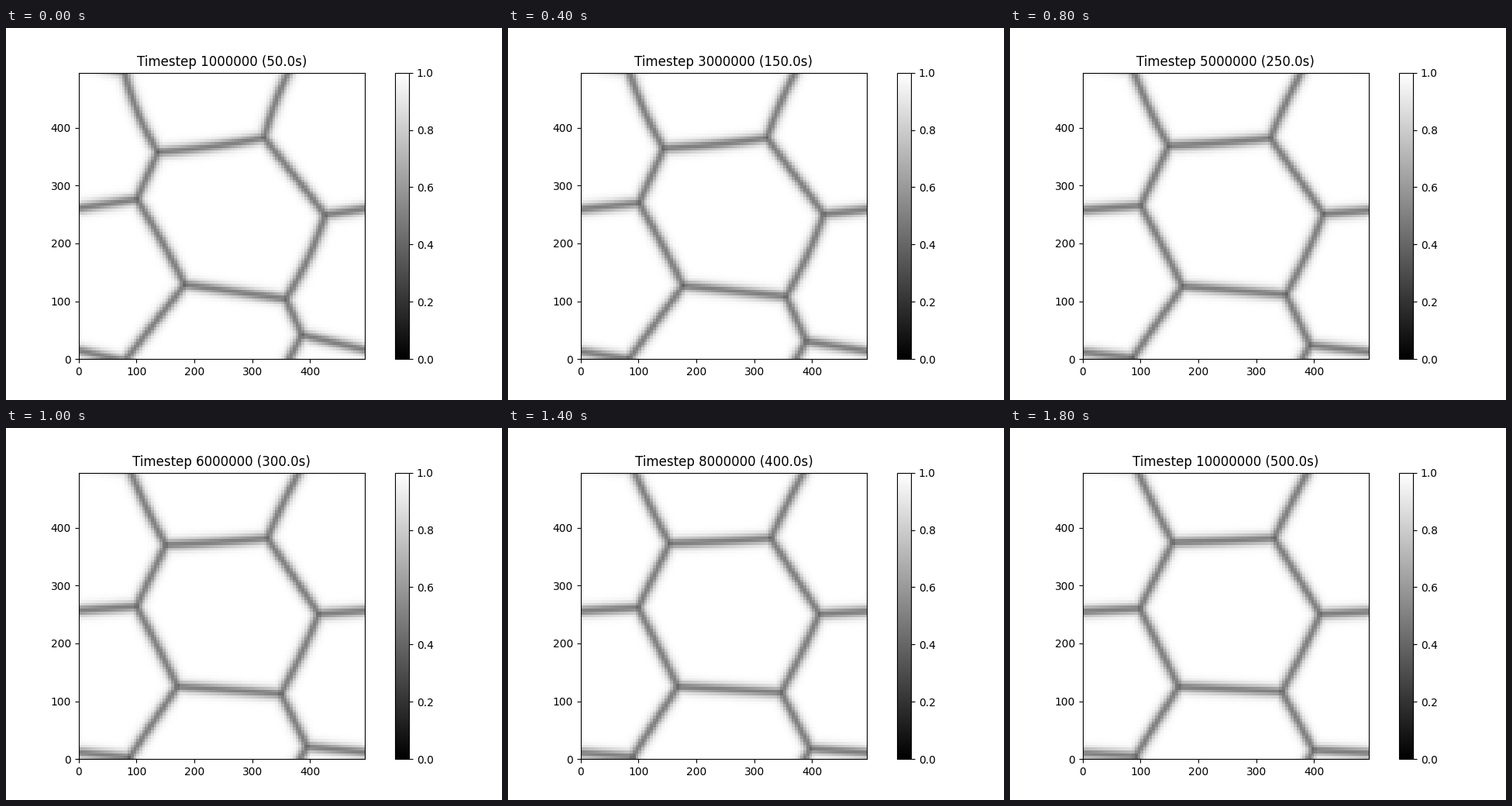
These frames come from a looping animation (640x480 px, 2000 ms). A matplotlib script:

```python
import numpy as np
import matplotlib.pyplot as plt
from matplotlib.animation import FuncAnimation

FRAMES, INTERVAL = 10, 200
PERIOD, CELL = 500.0, 5.0
WALL = 8.8        # wall thickness scale
SHARPNESS = 5.5   # how strongly walls add up where they meet
RELAX = 5.5       # relaxation time in steps

# Triple junctions at the start, after 3 steps and after 9 steps.
JUNCTIONS = {
    "A": [(137.1, 357.8), (146.5, 366.5), (155.9, 374.6)],
    "B": [(320.6, 382.6), (323.3, 381.9), (331.3, 381.5)],
    "C": [(426.4, 249.4), (418.4, 250.7), (411.0, 250.7)],
    "D": [(358.1, 104.1), (353.4, 110.1), (344.7, 116.8)],
    "E": [(183.3, 128.8), (174.6, 126.2), (165.9, 125.1)],
    "F": [(101.0, 276.2), (101.0, 267.4), (99.0, 260.1)],
    "G": [(386.2, 41.8), (391.6, 27.1), (399.0, 15.7)],
    "H": [(79.5, -3.7), (84.9, 0.9), (91.6, 5.0)],
}

# Walls between junctions with their initial bulge to the left.
WALLS = [
    ("A", "B", -3), ("B", "C", 0), ("C", "D", 5), ("D", "E", 0),
    ("E", "F", -2), ("F", "A", 0), ("A", "H", 6), ("F", "C", 0),
    ("D", "G", 0), ("G", "B", -5.5), ("G", "H", 0), ("E", "H", 0),
]

edges = np.arange(0, PERIOD, CELL)
centres = edges[:-1] + CELL / 2
X, Y = np.meshgrid(centres, centres)


def wrap(d):
    """Shortest difference on the periodic domain."""
    return d - PERIOD * np.round(d / PERIOD)


def progress(step):
    return (1 - np.exp(-step / RELAX)) / (1 - np.exp(-9 / RELAX))


def junction(name, u):
    """Quadratic path through the three known places."""
    p0, p1, p2 = np.array(JUNCTIONS[name])
    m = progress(3)
    return (p0 * (u - m) * (u - 1) / m
            + p1 * u * (u - 1) / (m * (m - 1))
            + p2 * u * (u - m) / (1 - m))


def wall_points(p, q, bulge, n=10):
    chord = wrap(q - p)
    normal = np.array([-chord[1], chord[0]]) / np.hypot(*chord)
    s = np.linspace(0, 1, n + 1)[:, None]
    return p + chord * s + 4 * s * (1 - s) * bulge * normal


def distance(points):
    best = np.full(X.shape, np.inf)
    for a, b in zip(points[:-1], points[1:]):
        mid, half = (a + b) / 2, (b - a) / 2
        dx, dy = wrap(X - mid[0]), wrap(Y - mid[1])
        s = np.clip((dx * half[0] + dy * half[1]) / (half @ half), -1, 1)
        best = np.minimum(best, np.hypot(dx - s * half[0], dy - s * half[1]))
    return best


def field(step):
    u = progress(step)
    places = {name: junction(name, u) for name in JUNCTIONS}
    total = np.zeros(X.shape)
    for start, end, bulge in WALLS:
        points = wall_points(places[start], places[end], bulge * (1 - 0.8 * u))
        total += np.cosh(np.minimum(distance(points) / WALL, 20)) ** (-2 * SHARPNESS)
    return 1 - 0.5 * total ** (1 / SHARPNESS)


fig, ax = plt.subplots(figsize=(6.4, 4.8), dpi=100)
mesh = ax.pcolormesh(edges, edges, field(0), cmap="gray", vmin=0, vmax=1)
fig.colorbar(mesh, ax=ax)
# The colorbar pushes the axes to the right, so centre them again.
ax.set_aspect("equal", anchor="C")
title = ax.set_title("")


def update(i):
    mesh.set_array(field(i))
    title.set_text(f"Timestep {(i + 1) * 1000000} ({(i + 1) * 50:.1f}s)")
    return mesh, title


anim = FuncAnimation(fig, update, frames=FRAMES, interval=INTERVAL,
                     repeat=True, repeat_delay=0)
plt.show()
```
